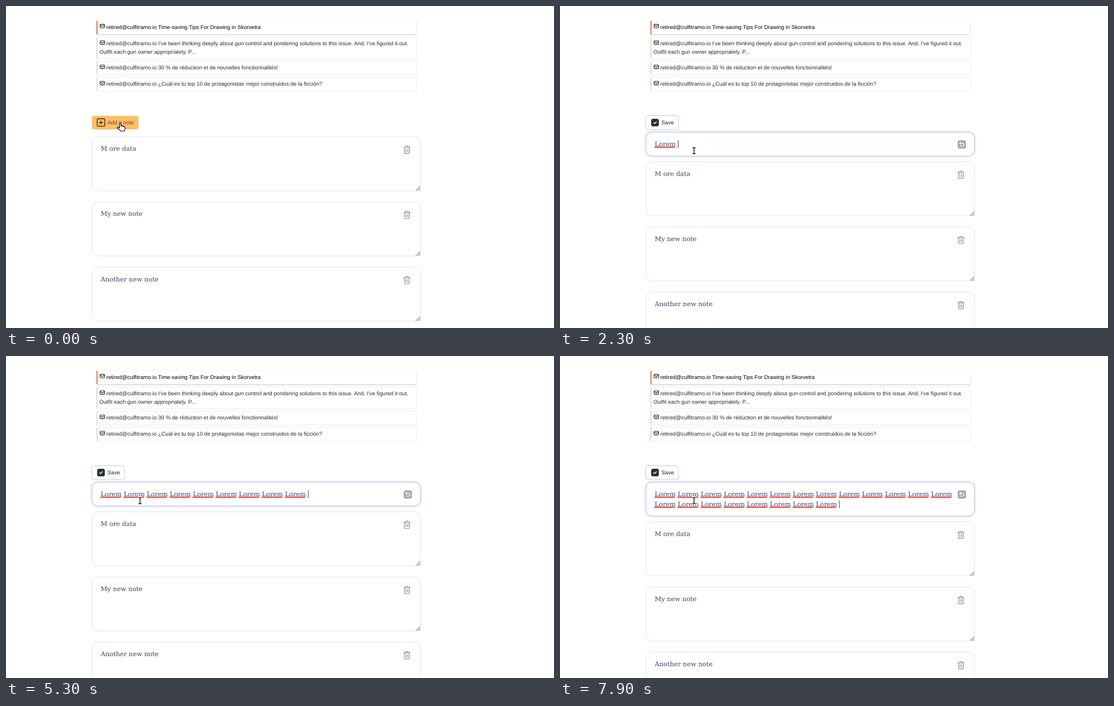
Write an HTML page that moves like this. It is 975 by 574 pixels and loops after 8 s.

```html
<!DOCTYPE html>
<html lang="en">
<head>
<meta charset="utf-8">
<title>Notes</title>
<style>
  html, body { margin: 0; width: 100%; height: 100%; overflow: hidden; background: #fff; }
  svg { display: block; width: 100%; height: 100%; }
  text { white-space: pre; text-rendering: geometricPrecision; }
  .sans { font: 9.7px "Liberation Sans", Arial, sans-serif; fill: #2b2b2b; }
  .serif { font: 11.38px "DejaVu Serif", serif; fill: #3d4163; }
  .line { fill: none; stroke-linecap: round; stroke-linejoin: round; }
  .row { fill: #fff; filter: drop-shadow(0 .8px .8px rgba(0, 0, 0, .16)); }
  .row.first { filter: drop-shadow(0 1px 1.2px rgba(0, 0, 0, .23)); }
</style>
</head>
<body>
<svg viewBox="0 0 975 574">
  <defs>
    <g id="mail" class="line" stroke="#222" stroke-width="1.1">
      <rect x="-4" y="-3.2" width="8" height="6.4" rx="1.2"/>
      <path d="M-3.8 -1.8 L0 .8 L3.8 -1.8"/>
    </g>
    <g id="trash" class="line" stroke="#8a8a8a" stroke-width="1.15">
      <path d="M-5.6 -4.2 H5.6 M-2.4 -4.4 V-5.6 Q-2.4 -6.6 -1.4 -6.6 H1.4 Q2.4 -6.6 2.4 -5.6 V-4.4"/>
      <path d="M-4.4 -4 V5 Q-4.4 6.6 -2.8 6.6 H2.8 Q4.4 6.6 4.4 5 V-4 M-1.5 -1.3 V3.7 M1.5 -1.3 V3.7"/>
    </g>
    <path id="grip" class="line" stroke="#777" stroke-width=".9" d="M-8 0 L0 -8 M-5.6 0 L0 -5.6 M-3.2 0 L0 -3.2 M-1 0 L0 -1"/>
  </defs>

  <g id="rows"></g>

  <g id="add">
    <rect x="152.8" y="195.8" width="82.9" height="24.2" rx="4" fill="#fdbe68"/>
    <g class="line" stroke="#33291b" stroke-width="1.35">
      <rect x="162.3" y="201" width="13.4" height="13.4" rx="1.8"/>
      <path d="M169 204.6 V210.8 M165.9 207.7 H172.1"/>
    </g>
    <text class="sans" x="180.6" y="210.6" style="fill:#65502e">Add a note</text>
  </g>

  <g id="save">
    <rect x="152.5" y="195.5" width="58.2" height="24.8" rx="4" fill="#fff" stroke="#b5d3d6"/>
    <rect x="162.2" y="201" width="13.6" height="13.6" rx="3.4" fill="#2c2c31"/>
    <path class="line" stroke="#fff" stroke-width="1.4" d="M166.5 208 L168.3 209.7 L171.6 206.3"/>
    <text class="sans" x="180.6" y="210.6" style="fill:#222">Save</text>
  </g>

  <g id="editor">
    <rect id="glow" x="151.4" y="223.4" width="587.6" rx="12.5" fill="none" stroke="#e9ebfc" stroke-width="2.4"/>
    <rect id="field" x="153" y="225" width="584.4" rx="11" fill="#fff"/>
    <rect id="pick" x="168.5" y="239" height="14" fill="#b5cdf5"/>
    <text id="line0" class="serif" x="168.5" y="250.2"></text>
    <text id="line1" class="serif" x="168.5" y="268.1"></text>
    <path id="waves" class="line" stroke="#e3211f" stroke-width="1.4"/>
    <rect id="caret" width="1" height="13.6" fill="#34363f"/>
    <rect x="707.6" y="239.4" width="14.6" height="14.6" rx="3.6" fill="#a6a6a6"/>
    <path class="line" stroke="#fff" stroke-width="1.3" d="M713 242.7 L711 244.8 L713 246.9 M711.3 244.8 H716.2 Q718.7 244.8 718.7 247.3 Q718.7 249.8 716.2 249.8 H711.5"/>
  </g>

  <g id="notes"></g>

  <path id="hand" stroke="#111" stroke-width="1.2" stroke-linejoin="round" fill="#fff"
    d="M-2.4 1.4 V-5.6 Q-2.3 -7 -1.1 -7 Q.2 -7 .2 -5.6 V-2 Q.8 -3 1.9 -2.7 Q2.7 -2.4 2.7 -1.5 Q3.6 -2.4 4.5 -1.8 Q5.1 -1.4 5.1 -.7 Q6.2 -1.3 6.9 -.4 Q7.2 0 7.2 .8 V3 Q7.2 4.6 6.2 5.8 V7 H-1.1 V5.8 L-5.9 1.8 Q-6.8 .8 -6 0 Q-5.1 -.7 -4 .2 Z"/>
  <g id="beam" class="line">
    <path stroke="#fff" stroke-width="3" d="M-2.4 -5.4 H2.4 M0 -5.4 V5.4 M-2.4 5.4 H2.4"/>
    <path stroke="#111" stroke-width="1.4" d="M-2.4 -5.4 H-.8 L0 -4.8 L.8 -5.4 H2.4 M0 -4.8 V4.8 M-2.4 5.4 H-.8 L0 4.8 L.8 5.4 H2.4"/>
  </g>
</svg>
<script>
const $ = id => document.getElementById(id);
const set = (el, attrs) => { for (const k in attrs) el.setAttribute(k, attrs[k]); };
const show = (el, on) => { el.style.display = on ? '' : 'none'; };

const LOOP = 8000, LEFT = 168.5, LINE = 17.9, PER_LINE = 13;
const WORD = 'Lorem ';
const SENDER = 'retired@culfitramo.io ';

// top, height, lines of text
const mails = [
  [26.4, 23.8, 'Time-saving Tips For Drawing in Skorvetra'],
  [55.8, 37.6, 'I’ve been thinking deeply about gun control and pondering solutions to this issue. And, I’ve figured it out.',
    'Outfit each gun owner appropriately. P...'],
  [99, 23.4, '30 % de réduction et de nouvelles fonctionnalités!'],
  [128, 23.4, '¿Cuál es tu top 10 de protagonistas mejor construidos de la ficción?']
];
$('rows').innerHTML = mails.map(([y, h, head, more], i) => {
  const fill = i ? '#2b2b2b' : '#000';
  return `<rect class="row${i ? '' : ' first'}" x="161" y="${y}" width="569" height="${h}"/>
    <rect x="161" y="${y}" width="2" height="${h}" fill="${i ? '#fad9c8' : '#e2835f'}"/>
    <use href="#mail" x="171.4" y="${y + 9.4}"/>
    <text class="sans" x="178.5" y="${y + 14.1}" style="fill:${fill}">${SENDER}${head}</text>
    ${more ? `<text class="sans" x="166.2" y="${y + 28.7}">${more}</text>` : ''}`;
}).join('');

$('notes').innerHTML = ['M ore data', 'My new note', 'Another new note'].map((label, i) => {
  const y = 233 + i * 116.2;
  return `<rect x="153" y="${y}" width="584.4" height="96.4" rx="11" fill="#fff" stroke="#e1e3f4"/>
    <text class="serif" x="${LEFT}" y="${y + 25.1}">${label}</text>
    <use href="#trash" x="713.3" y="${y + 23.2}"/>
    <use href="#grip" x="737" y="${y + 95.9}"/>`;
}).join('');

// time, letters typed of the first word
const typing = [[0, 0], [1600, 1], [1800, 2], [2000, 4], [2200, 5], [2300, 6]];
// time, words present, words spell-checked
const pastes = [
  [2300, 1, 1], [3600, 1, 0], [3900, 2, 2], [4000, 3, 3],
  [4300, 4, 4], [4400, 5, 4], [4500, 5, 5], [4600, 6, 6], [4900, 7, 7], [5100, 8, 8],
  [5300, 9, 9], [5400, 10, 9], [5500, 10, 10], [5600, 11, 10], [5700, 11, 11], [5800, 12, 12],
  [6100, 13, 13], [6500, 14, 14], [6700, 15, 14], [6800, 15, 15],
  [7000, 16, 16], [7100, 17, 16], [7200, 17, 17], [7300, 18, 18],
  [7600, 19, 19], [7700, 20, 19], [7800, 20, 20], [7900, 21, 21]
];
const at = (steps, t) => steps.filter(s => s[0] <= t).pop();

const measure = str => {
  $('line0').textContent = str;
  return str ? $('line0').getComputedTextLength() : 0;
};
const pitch = measure(WORD), wordWidth = measure(WORD.trim());

function wave(i) {
  const x = LEFT + (i % PER_LINE) * pitch;
  const y = 251.8 + Math.floor(i / PER_LINE) * LINE;
  let d = `M${x} ${y + .7}`;
  for (let dx = 1.7, up = true; dx <= wordWidth; dx += 1.7, up = !up)
    d += `L${x + dx} ${y + (up ? -.7 : .7)}`;
  return d;
}

function drawEditor(t) {
  const focused = t >= 900;
  const [, words, checked] = at(pastes, t) || [0, 0, 0];
  const text = words ? WORD.repeat(words) : WORD.slice(0, at(typing, t)[1]);
  const cut = PER_LINE * WORD.length;
  const lines = [text.slice(0, cut), text.slice(cut)];
  const last = lines[1] ? 1 : 0;
  const height = 42.3 + last * LINE;
  const picked = t >= 3000 && t < 3600;

  const end = LEFT + measure(lines[last]);
  $('line0').textContent = lines[0];
  $('line1').textContent = lines[1];
  set($('field'), { height, stroke: focused ? '#b9c0ee' : '#e1e3f4' });
  set($('glow'), { height: height + 3.2 });
  set($('pick'), { width: pitch });
  set($('caret'), { x: end + .3, y: 239.4 + last * LINE });
  set($('waves'), { d: Array.from({ length: checked }, (_, i) => wave(i)).join('') });
  show($('glow'), focused);
  show($('caret'), focused && !picked);
  show($('pick'), picked);
  return last;
}

function draw(t) {
  const editing = t >= 300;
  const wrapped = drawEditor(t);
  show($('add'), !editing);
  show($('save'), editing);
  show($('editor'), editing);
  set($('notes'), { transform: `translate(0 ${editing ? 44.7 + wrapped * LINE : 0})` });

  // the pointer moves in tenths of a second
  const u = Math.min(1, Math.max(0, (Math.floor(t / 100) - 3) / 4));
  const place = `translate(${204.5 + 34 * u} ${216 + 42 * u})`;
  set($('hand'), { transform: place });
  set($('beam'), { transform: place });
  show($('hand'), u === 0);
  show($('beam'), u > 0);
}

const start = performance.now();
function tick() {
  draw((performance.now() - start) % LOOP);
  requestAnimationFrame(tick);
}
tick();
</script>
</body>
</html>
```
